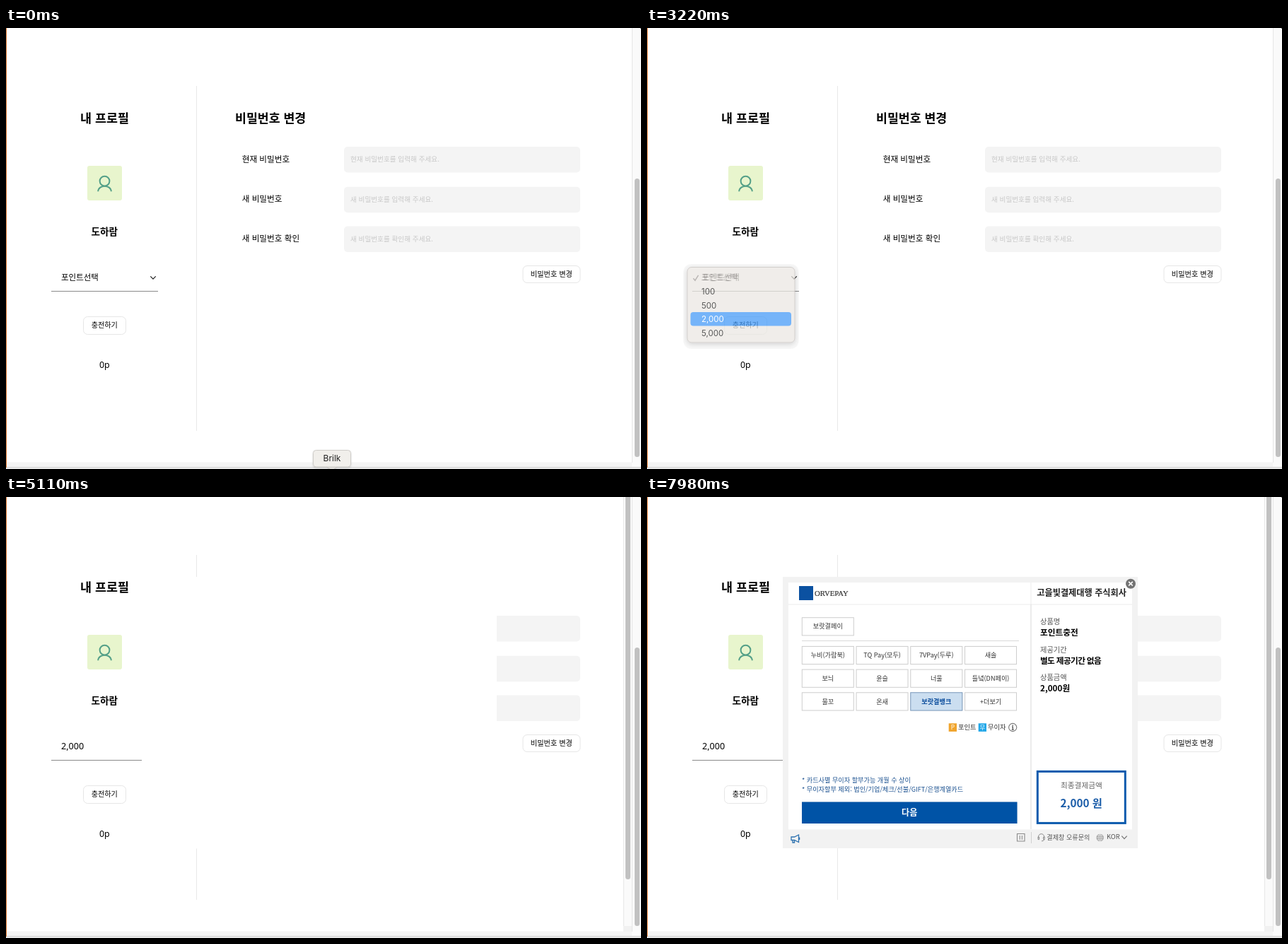
An HTML page that plays this animation: 898 px wide and 624 px high, repeating every 8 s.

```html
<!DOCTYPE html>
<html lang="ko">
<head>
<meta charset="utf-8">
<title>포인트 충전</title>
<style>
html, body { margin: 0; width: 100%; height: 100%; overflow: hidden; background: #fff; }
svg { display: block; width: 898px; height: 624px; }
text { font-family: "Noto Sans CJK KR", "Noto Sans CJK", "Noto Sans KR", sans-serif; white-space: pre; }
.ui { font-family: Inter, "Noto Sans CJK KR", sans-serif; }
.num { font-family: "Noto Sans", "Noto Sans CJK KR", sans-serif; }
.serif { font-family: "Liberation Serif", serif; }
</style>
</head>
<body>
<svg id="stage" viewBox="0 0 898 624" xmlns="http://www.w3.org/2000/svg"></svg>
<script>
const LOOP = 8000, STEP = 70;

const attrs = o => Object.entries(o).map(([k, v]) => ` ${k}="${v}"`).join('');
const rect = (x, y, w, h, fill, o = {}) =>
  `<rect x="${x}" y="${y}" width="${w}" height="${h}" fill="${fill}"${attrs(o)}/>`;
const path = (d, stroke, width = 1, o = {}) =>
  `<path d="${d}" fill="none" stroke="${stroke}" stroke-width="${width}"${attrs(o)}/>`;
const text = (x, y, str, size, o = {}) =>
  `<text x="${x}" y="${y}" font-size="${size}"${attrs(o)}>${str}</text>`;
const group = (id, body, o = {}) => `<g id="${id}"${attrs(o)}>${body}</g>`;
const mid = { 'text-anchor': 'middle' };
const bold = { 'font-weight': 700 };
const medium = { 'font-weight': 500 };

function profile() {
  return text(139.5, 134.3, '내 프로필', 17.4, { ...mid, ...bold })
    + rect(115, 195, 49, 49, '#e8f5cd', { rx: 3 })
    + path('M130.2 231.3C130.8 221.2 148.2 221.2 148.8 231.3', '#54a088', 2)
    + `<circle cx="139.5" cy="216.6" r="6.9" fill="#e8f5cd" stroke="#54a088" stroke-width="2"/>`
    + text(139.3, 292.8, '도하람', 13.6, { ...mid, ...bold })
    + group('choice', text(78, 356.6, '포인트선택', 11.5, medium))
    + group('amount', text(78, 356.6, '2,000', 12.6, { class: 'num' }))
    + path('M204.3 351.4L208 355.1L211.7 351.4', '#222', 1.3)
    + path('M64 372.5H215', '#8a8a8a')
    + rect(109.5, 408.5, 60, 25, '#fff', { rx: 6, stroke: '#e6e6e6' })
    + text(139.3, 424.4, '충전하기', 10.1, { ...mid, ...medium })
    + text(139.4, 480.5, '0p', 12.4, { ...mid, class: 'num' })
    + path('M269.5 82V570', '#e8e8e8');
}

function passwordForm() {
  const rows = [
    ['현재 비밀번호', '현재 비밀번호를 입력해 주세요.', 168],
    ['새 비밀번호', '새 비밀번호를 입력해 주세요.', 224.7],
    ['새 비밀번호 확인', '새 비밀번호를 확인해 주세요.', 280.6]
  ];
  return text(324, 134.3, '비밀번호 변경', 17.3, bold)
    + rows.map(([label, hint, y]) =>
      text(333.7, y + 21.6, label, 11.65, medium)
      + rect(478, y, 334, 36.5, '#f4f4f4', { rx: 5 })
      + text(487, y + 21.4, hint, 9.65, { fill: '#c8c8c8' })).join('')
    + rect(731, 336.5, 81, 24, '#fff', { rx: 6, stroke: '#e6e6e6' })
    + text(771.4, 352.4, '비밀번호 변경', 10.2, { ...mid, ...medium });
}

function windowEdges() {
  return rect(0, 614.5, 886, 7, '#f4f4f4')
    + rect(885, 0, 13, 621, '#fafafa')
    + path('M885.5 0V615', '#e6e6e6')
    + rect(889, 213, 7, 394, '#c1c1c1', { rx: 3.5 })
    + rect(0, 621, 898, 3, '#eaeaea')
    + path('M0 621.5H898', '#d6d6d6')
    + rect(0, 0, 1, 622, '#d9762f')
    + rect(897, 0, 1, 1, '#666');
}

function tooltip() {
  return path('M453 621L461 626L469 621', '#cfcdc9', 1, { style: 'fill:#f1efeb' })
    + rect(434.5, 597.5, 53, 23.5, '#f1efeb', { rx: 4, stroke: '#cfcdc9', filter: 'url(#soft)' })
    + text(461, 612.8, 'Brilk', 12, { ...mid, class: 'ui', fill: '#222' });
}

function menu() {
  const items = ['100', '500', '2,000', '5,000'];
  return rect(51.5, 334, 163, 120, '#000', { rx: 11, 'fill-opacity': .045 })
    + rect(57, 338.5, 152, 106.5, '#efe6e4', { id: 'menuBg', rx: 6, stroke: '#c4bebc', filter: 'url(#drop)' })
    + path('M65.5 354.2L68 357.2L72.6 349.8', '#a29c9a', 1.4)
    + text(76.5, 357, '포인트선택', 11.2, { fill: '#a8a2a0' })
    + rect(61.5, 363, 142.5, 19.5, '#479cf8', { id: 'hover', rx: 4 })
    + items.map((s, i) => text(77, 377.2 + i * 19.5, s, 11.5, { class: 'ui item', fill: '#222' })).join('');
}

function innerScroll() {
  return rect(873, 0, 12, 615, '#fafafa')
    + path('M873.5 0V615', '#e8e8e8')
    + rect(873, 607, 12, 8, '#f1f1f1')
    + path('M876 0H883V537.5A3.5 3.5 0 0 1 876 537.5Z', 'none', 0, { style: 'fill:#c1c1c1' });
}

function loader() {
  return rect(192, 113, 502, 384.5, '#cbcbcb')
    + path('M192 497H694', '#c2c2c2')
    + group('spin', rect(434, 296, 19, 19, '#86acd8')
      + path('M424.9 306.7A18.2 18.2 0 1 1 457.8 318.6', '#0a62c9', 6, { id: 'arc' }));
}

function frame() {
  const grey = '#8a8a8a', blue = '#0c5aad';
  const info = [['상품명', '포인트충전', 180.3], ['제공기간', '별도 제공기간 없음', 219.8], ['상품금액', '2,000원', 259.4]];
  return rect(192, 113, 502, 384, '#f2f2f2')
    + rect(200, 121, 486, 349.5, '#fff')
    + path('M200 152H686M543 121V152', '#ececec')
    + path('M543 152V470', '#d9d9d9')
    + rect(215, 126, 20, 20, '#0b51a1')
    + text(237, 140.2, 'ORVEPAY', 10.7, { class: 'serif', fill: '#333', stroke: '#333', 'stroke-width': .2 })
    + text(678, 140.2, '고을빛결제대행 주식회사', 12.2, { 'text-anchor': 'end', ...bold, fill: '#222' })
    + info.map(([k, v, y], i) => text(556, y, k, 10.25, { fill: '#555' })
      + text(556, y + 15.8, v, 11.7, { ...bold, 'letter-spacing': i === 1 ? -.65 : 0 })).join('')
    + rect(552.3, 388.4, 124, 73, '#fff', { stroke: blue, 'stroke-width': 3 })
    + text(614.4, 411.6, '최종결제금액', 10.7, { ...mid, fill: '#666' })
    + text(614.2, 438.8, '2,000 원', 15.3, { ...mid, ...bold, fill: '#1a5ca8' })
    + `<circle cx="684" cy="122.7" r="7" fill="#737373"/>`
    + path('M681.2 119.9L686.8 125.5M686.8 119.9L681.2 125.5', '#fff', 1.7)
    // footer icons
    + path('M204 481H208.5L214.5 478V488.5L208.5 485.5H204ZM206 485.5V489H208.5V485.5M215.6 481.6V485', '#2f73b0', 1.3)
    + path('M523.5 476.5H534V487H523.5ZM527.2 479V484.8M530.4 479V484.8', grey, 1.1)
    + path('M543.5 474V490', '#cfcfcf')
    + path('M553.3 481.5A4.3 4.8 0 0 1 561.9 481.5M553 481V484.6H554.6V481ZM560.6 481V484.6H562.2V481ZM561.6 485Q561 487 558 486.8', grey)
    + text(565.3, 484.8, '결제창 오류문의', 9.1, { fill: '#555' })
    + `<circle cx="640.7" cy="482" r="5.2" fill="#9a9a9a"/>`
    + path('M635.7 482H645.7M640.7 477V487M636.8 479.2H644.6M636.8 484.8H644.6', '#f2f2f2', .7)
    + `<ellipse cx="640.7" cy="482" rx="2.5" ry="5" fill="none" stroke="#f2f2f2" stroke-width=".7"/>`
    + text(650, 484.4, 'KOR', 9.4, { fill: '#555' })
    + path('M671.3 479.6L675 483.6L678.7 479.6', '#777', 1.3);
}

const cardX = c => 219.3 + c * 76.75;
function card(c, y, name, picked) {
  return rect(cardX(c), y, 73, 25.2, picked ? '#cbdef0' : '#fff', { stroke: picked ? '#7f9fc2' : '#cdcdcd' })
    + text(cardX(c) + 36.5, y + 15.7, name, 9.15,
      picked ? { ...mid, ...bold, fill: '#0a4c9c' } : { ...mid, fill: '#333' });
}

function nextButton(fill, ink) {
  return rect(219, 431.5, 304.5, 30.5, fill)
    + text(371.2, 450.8, '다음', 12.1, { ...mid, ...bold, fill: ink });
}

function cards() {
  const grid = [
    ['누비(가람북)', 'TQ Pay(모두)', '7VPay(두루)', '새솔'],
    ['보늬', '윤슬', '너울', '들녘(DN페이)'],
    ['물꼬', '온새', '보랏결뱅크', '+더보기']
  ];
  const badge = (x, fill, s) => rect(x, 320.3, 11.3, 11.6, fill)
    + text(x + 5.6, 329.4, s, 8.4, { ...mid, fill: '#fff' });
  return card(0, 170.7, '보랏결페이')
    + path('M219 203.5H526', '#d9d9d9')
    + grid.map((row, r) => row.map((s, c) => card(c, 211.4 + r * 32.7, s)).join('')).join('')
    + badge(426.7, '#f0a42c', 'P') + text(440, 329.2, '포인트', 9.3, { fill: '#333' })
    + badge(468.7, '#22a7e8', '무') + text(482, 329.2, '무이자', 9.3, { fill: '#333' })
    + `<circle cx="517.2" cy="326" r="5.6" fill="#fff" stroke="#777" stroke-width="1.1"/>`
    + path('M517.2 322.4V323.9M516 325.2H517.3V329M515.7 329.2H518.8', '#555', 1.3)
    + text(219, 403.6, '* 카드사별 무이자 할부가능 개월 수 상이', 9.15, { fill: '#1b5190' })
    + text(219, 417.4, '* 무이자할부 제외: 법인/기업/체크/선불/GIFT/은행계열카드', 9.15, { fill: '#1b5190' })
    + nextButton('#d8d8d8', '#555');
}

const stage = document.getElementById('stage');
stage.innerHTML = `<defs>
  <filter id="soft" x="-20%" y="-30%" width="140%" height="160%"><feDropShadow dx="0" dy="1" stdDeviation="1" flood-opacity=".18"/></filter>
  <filter id="drop" x="-20%" y="-20%" width="140%" height="140%"><feDropShadow dx="0" dy="2" stdDeviation="3" flood-opacity=".2"/></filter>
  </defs>`
  + rect(0, 0, 898, 624, '#fff')
  + profile() + passwordForm() + windowEdges()
  + group('tip', tooltip())
  + group('menu', menu())
  + group('bar', innerScroll())
  + group('blank', rect(192, 113, 502, 384.5, '#fff'))
  + group('loader', loader())
  + group('pay', frame())
  + group('cards', cards())
  + group('picked', card(2, 276.8, '보랏결뱅크', true) + nextButton('#0053a6', '#fff'));

const $ = id => document.getElementById(id);
const items = [...document.querySelectorAll('.item')];
const clamp = v => Math.max(0, Math.min(1, v));
const ramp = (t, a, b) => clamp((t - a) / (b - a));
const show = (id, alpha) => {
  const s = $(id).style;
  s.display = alpha > 0 ? '' : 'none';
  s.opacity = alpha;
};

function hoveredRow(t) {
  if (t < 2240 || (t >= 3080 && t < 3150)) return -1;
  return t < 2310 ? 0 : t < 2590 ? 1 : 2;
}

function draw(ms) {
  const t = Math.floor(ms / STEP) * STEP;

  show('tip', 1 - ramp(t, 140, 560));

  const chosen = t >= 3290;
  show('choice', chosen ? 0 : 1);
  show('amount', chosen ? 1 : 0);

  const fade = t < 3220 ? 1 : .75 * (1 - ramp(t, 3220, 3640));
  show('menu', t >= 1540 ? fade : 0);
  $('menuBg').setAttribute('fill', t < 3220 ? '#efe6e4' : '#ebe8e3');
  const row = hoveredRow(t);
  show('hover', row < 0 ? 0 : 1);
  $('hover').setAttribute('y', 363 + Math.max(row, 0) * 19.5);
  items.forEach((el, i) => el.setAttribute('fill', i === row ? '#fff' : '#222'));

  show('bar', t >= 4270 ? 1 : 0);
  show('blank', t >= 4970 && t < 6300 ? 1 : 0);
  show('loader', t < 5040 ? ramp(t, 4270, 4550) : .5 * (t < 5110));
  show('spin', t >= 4480 ? 1 : 0);
  $('arc').setAttribute('transform', `rotate(${(t - 4970) * .36} 443.1 306)`);

  show('pay', t >= 6300 ? 1 : 0);
  show('cards', ramp(t, 6300, 6580));
  show('picked', ramp(t, 7770, 7980));
}

const start = performance.now();
function tick() {
  draw((performance.now() - start) % LOOP);
  requestAnimationFrame(tick);
}
draw(0);
tick();
</script>
</body>
</html>
```
